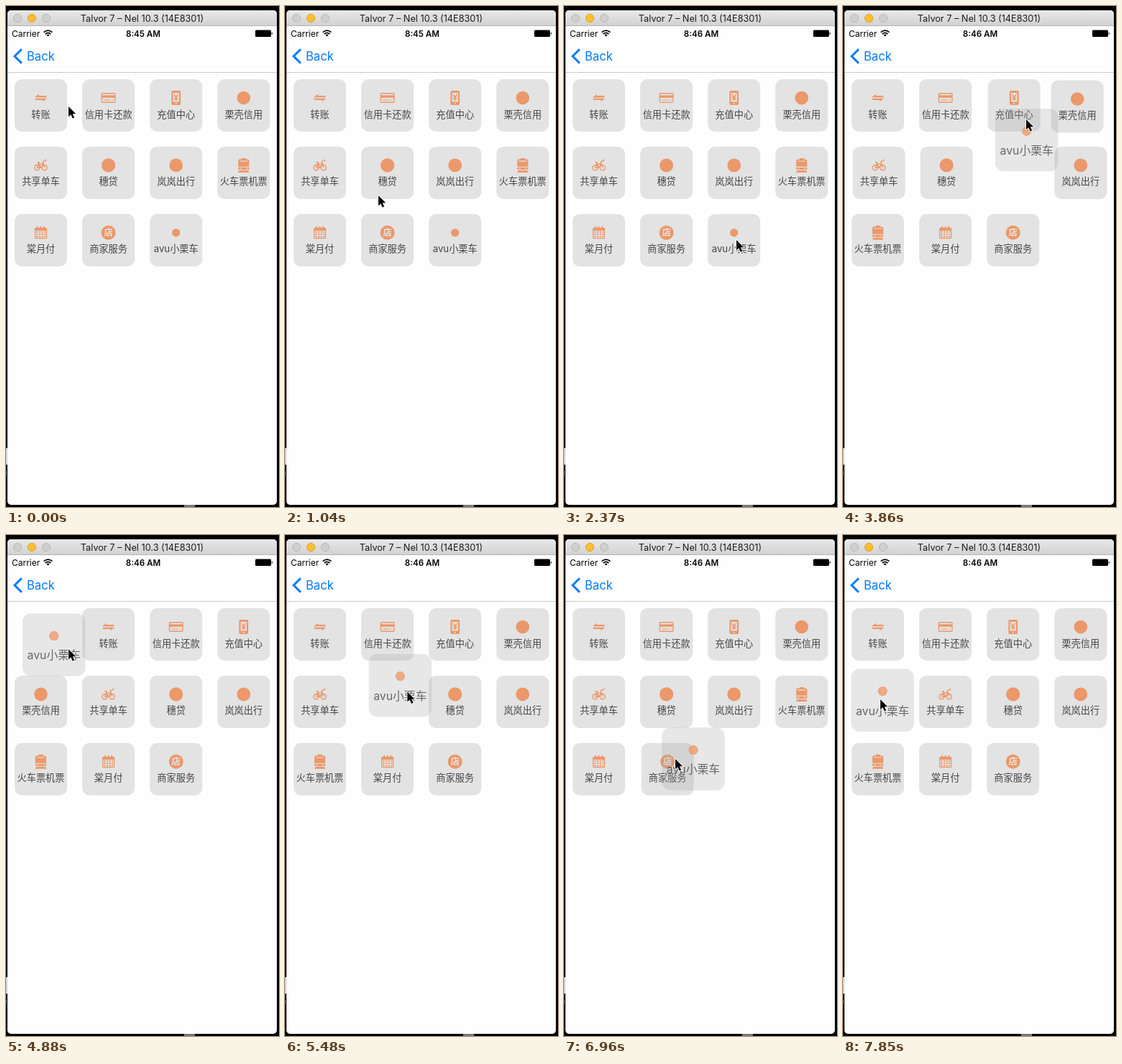
Recreate the animation shown at these times as an HTML page. Size 380 by 698 pixels, loop 8 s.

```html
<!DOCTYPE html>
<html lang="zh-CN">
<head>
<meta charset="utf-8">
<title>Drag to reorder</title>
<style>
  html, body { margin: 0; width: 100%; height: 100%; overflow: hidden; background: #000; }
  svg { display: block; width: 380px; height: 698px; }
  text { font-family: Inter, "Noto Sans CJK SC", "Noto Sans CJK", sans-serif; }
  .label { font-size: 13.2px; fill: #464646; text-anchor: middle; }
  .icon { fill: #eb986a; }
  .line { fill: none; stroke: #eb986a; stroke-width: 1.4; }
  .gap { fill: #e4e4e4; }
  .cut { fill: none; stroke: #e4e4e4; stroke-width: 1.1; }
</style>
</head>
<body>
<svg viewBox="0 0 380 698">
  <defs>
    <linearGradient id="bar" x2="0" y2="1">
      <stop offset="0" stop-color="#e8e8e8"/><stop offset="1" stop-color="#d1d1d1"/>
    </linearGradient>
  </defs>
  <rect width="380" height="698"/>
  <path d="M0 616h2v23h-2z" fill="#d4d4d4"/>
  <path d="M0 648h1v6h-1z" fill="#666"/>
  <path d="M248 695h15v3h-15z" fill="#777"/>
  <rect x="2" y="6" width="375" height="689" rx="5" fill="#fefefe"/>
  <path d="M2 28V11a5 5 0 0 1 5-5H372a5 5 0 0 1 5 5V28z" fill="url(#bar)"/>
  <path d="M2 27.5H377" stroke="#b4b4b4"/>
  <g id="lights"></g>
  <text x="189.5" y="21.7" font-size="12.7" text-anchor="middle" fill="#1c1c1c">Talvor 7 – Nel 10.3 (14E8301)</text>

  <text x="8" y="42.5" font-size="12">Carrier</text>
  <g fill="none" stroke="#000" stroke-width="1.7">
    <path d="M52.6 36.6Q58.5 31.6 64.4 36.6M54.7 39Q58.5 35.8 62.3 39"/>
    <path d="M58.5 42.6L56.4 40.3Q58.5 38.7 60.6 40.3z" fill="#000" stroke="none"/>
  </g>
  <text id="clock" x="191" y="42.5" font-size="11.6" font-weight="600" text-anchor="middle"></text>
  <rect x="347" y="33.5" width="22" height="9.5" rx="1.5"/>
  <path d="M369.8 36.3q2.4 1.9 0 4z"/>
  <path d="M21.8 60.2L12 70L21.8 79.8" fill="none" stroke="#007aff" stroke-width="3"/>
  <text x="29" y="76" font-size="16.6" fill="#007aff">Back</text>
  <path d="M2 92.5H377" stroke="#c9c9c9"/>

  <g id="grid"></g>
  <path id="pointer" d="M0 0V14.2L3.3 11.2L5.7 16.6L8.1 15.5L5.8 10.3H10.2z"
        stroke="#fff" stroke-width="1.8" paint-order="stroke" stroke-linejoin="round"/>
</svg>
<script>
const LOOP = 8000, STEPS = 54;
const CLOCK_STEP = 8, PRESS = 7, RELEASE = 10, LIFT = 20;

// Icons are drawn around their own centre.
const disc = r => `<circle class="icon" r="${r}"/>`;
const wheel = x => `<circle class="line" cx="${x}" cy="3.2" r="3.6"/>`;
const arrow = turn => `<path class="icon" transform="rotate(${turn})" d="M-8.8-.7L-2.8-5.2V-3H7.8V-.7z"/>`;
const dayRow = y => `<path class="line" stroke-dasharray="2.2 1.5" style="stroke-width:2" d="M-6.3 ${y}H6.5"/>`;

const tiles = [
  ['转账', arrow(0) + arrow(180)],
  ['信用卡还款', `<rect class="line" x="-9.3" y="-6.3" width="18.6" height="12.6" rx="1.4"/>
    <path class="icon" d="M-9.5-3.6h19v3.4h-19z"/><path class="line" style="stroke-width:1" d="M-6.5 3H3M5 3H7"/>`],
  ['充值中心', `<rect class="icon" x="-6.4" y="-10" width="12.8" height="20" rx="2"/>
    <path class="gap" d="M-4.2-7h8.4v12.4h-8.4z"/><circle class="gap" cy="7.7" r="1"/>
    <path class="line" d="M-2.9-5L0-1.3L2.9-5M0-1.3V4M-2.8-.6H2.8M-2.8 1.7H2.8"/>`],
  ['栗壳信用', disc(9.3)],
  ['共享单车', `${wheel(-5.2)}${wheel(5.2)}
    <path class="line" d="M-5.2 3.2L-3-2H3.6L0 3.4H-5.2M0 3.4L-3.4-4M-5.2-4.2H-1.8M5.2 3.2L2.6-5.2L5.6-6"/>
    <circle class="icon" cx="6.6" cy="-7" r="1.2"/>`],
  ['穗贷', disc(9.6)],
  ['岚岚出行', disc(9.4)],
  ['火车票机票', `<path class="icon" d="M-3-10H3V-8.3H5.5Q7.6-8.3 7.6-6V6H-7.6V-6Q-7.6-8.3-5.5-8.3H-3zM-6 7H6L8 10H-8z"/>
    <path class="cut" d="M-5.5-5.8H5.5M-7.6 2.4H7.6M-5.4 4.5H-3.4M3.4 4.5H5.4"/>`],
  ['棠月付', `<rect class="icon" x="-8.6" y="-6.8" width="17.2" height="15.2" rx="1.4"/>
    <path class="line" style="stroke-width:2" d="M-4.6-8.8V-5M0-8.8V-5M4.6-8.8V-5"/>
    <path class="gap" d="M-7.3-2.8H7.3V7.1H-7.3z"/>${[-1, 2.2, 5.4].map(dayRow).join('')}`],
  ['商家服务', `${disc(10)}<text y="4.5" font-size="12.4" font-weight="700" text-anchor="middle" class="gap">店</text>`],
  ['avu小栗车', disc(5.6)],
];

// Turning points of the pointer: [step, x, y].
const turns = [
  [0, 87, 140], [3, 51, 143], [4, 51, 143], [7, 130, 264], [10, 150, 340], [12, 155, 340],
  [16, 240, 326], [21, 240, 326], [25, 252, 206], [26, 255, 158], [28, 225, 148], [32, 49, 149],
  [33, 87, 159], [39, 212, 248], [42, 215, 251], [45, 230, 312], [49, 80, 312], [52, 53, 231], [53, 52, 229]];

const clamp = v => Math.min(1, Math.max(0, v));
const mix = (a, b, p) => a.map((v, i) => v + (b[i] - v) * p);
const ease = p => p < .5 ? 2 * p * p : 1 - 2 * (1 - p) ** 2;

function pointerAt(step) {
  const i = turns.findIndex(([at]) => at >= step);
  const [end, ...to] = turns[i];
  if (i === 0) return to;
  const [start, ...from] = turns[i - 1];
  return mix(from, to, (step - start) / (end - start));
}

// The lifted tile trails the pointer a little.
function heldAt(step) {
  const [x, y] = pointerAt(step - .6);
  return [x + 2.5, y];
}

// Rubber band while pulled, then a quick decay.
function scrollAt(step) {
  if (step < PRESS) return 0;
  const height = 603;
  const pull = pointerAt(Math.min(step, RELEASE))[1] - pointerAt(PRESS)[1];
  return height * (1 - 1 / (pull * .55 / height + 1)) * Math.exp(-Math.max(0, step - RELEASE));
}

const slotCentre = slot => [48.5 + slot % 4 * 94.1, 138.5 + Math.floor(slot / 4) * 93.9];

function nearestSlot([x, y]) {
  const distance = tiles.map((_, slot) => {
    const [cx, cy] = slotCentre(slot);
    return Math.hypot(x - cx, y - cy);
  });
  return distance.indexOf(Math.min(...distance));
}

// The slot under the pointer opens up: [step, slot] at every change.
const openings = [[0, tiles.length - 1]];
for (let step = LIFT; step < STEPS; step++) {
  const slot = nearestSlot(pointerAt(step));
  if (slot !== openings.at(-1)[1]) openings.push([step, slot]);
}

function tileCentre(index, step) {
  return openings.reduce((at, [start, open]) => {
    const goal = slotCentre(index < open ? index : index + 1);
    return at ? mix(at, goal, ease(clamp((step - start + .18) / 2))) : goal;
  }, null);
}

const byId = id => document.getElementById(id);
const grid = byId('grid'), pointer = byId('pointer'), clock = byId('clock');

byId('lights').innerHTML = [['#cfcfcf', '#b9b9b9'], ['#fdbe30', '#dfa32b'], ['#cfcfcf', '#b9b9b9']]
  .map(([fill, stroke], i) => `<circle cx="${16 + i * 20}" cy="17" r="5.6" fill="${fill}" stroke="${stroke}"/>`).join('');
grid.innerHTML = tiles.map(([name, icon]) => `<g>
  <rect x="-36.5" y="-36.5" width="73" height="73" rx="10" fill="#aaa" fill-opacity=".33"/>
  <g transform="translate(0 -10.5)">${icon}</g>
  <text class="label" y="17">${name}</text></g>`).join('');
const nodes = [...grid.children];
const held = nodes.pop();

const place = (node, [x, y], scale = 1) =>
  node.setAttribute('transform', `translate(${x} ${y}) scale(${scale})`);

function draw(step) {
  const lifted = step >= LIFT;
  place(grid, [0, scrollAt(step)]);
  nodes.forEach((node, i) => place(node, tileCentre(i, step)));
  place(held, lifted ? heldAt(step) : slotCentre(nodes.length), lifted ? 1.2 : 1);
  held.setAttribute('opacity', lifted ? .82 : 1);
  place(pointer, pointerAt(step));
  clock.textContent = step < CLOCK_STEP ? '8:45 AM' : '8:46 AM';
}

const began = performance.now();
let shown = -1;
function tick() {
  const time = (performance.now() - began) % LOOP;
  const step = Math.min(STEPS - 1, Math.floor((time + 10) * STEPS / LOOP));
  if (step !== shown) draw(shown = step);
  requestAnimationFrame(tick);
}
tick();
</script>
</body>
</html>
```
